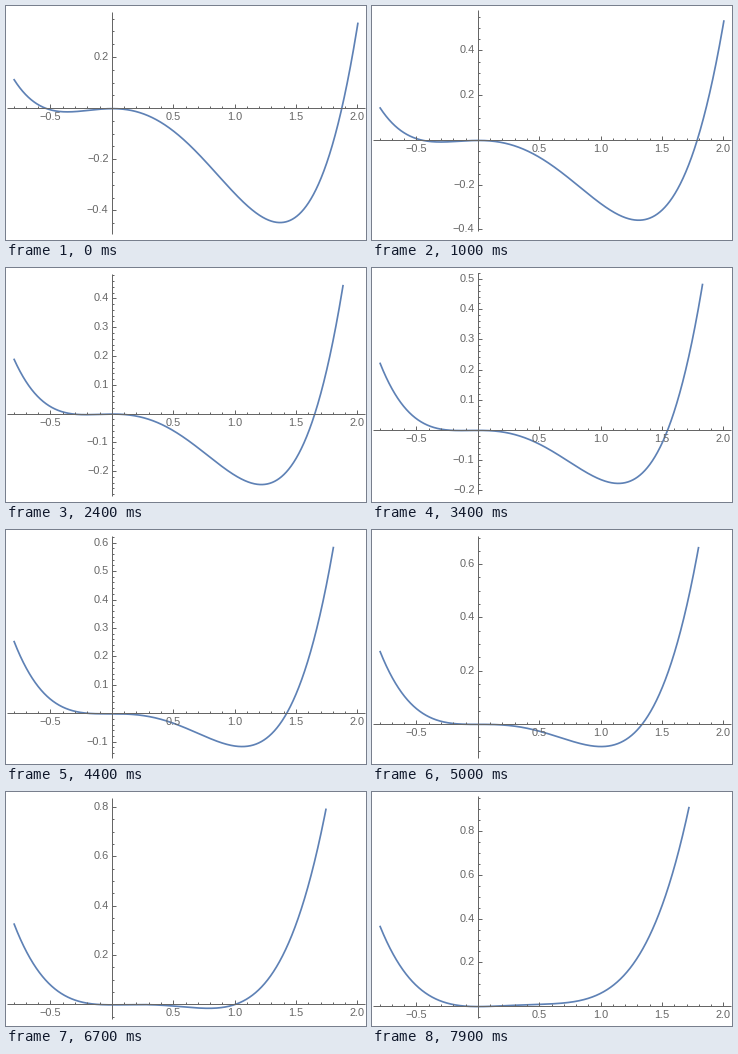
Animation, 360 px wide and 234 px high, one loop 8000 ms. Source, as a matplotlib script:

```python
import numpy as np
import matplotlib.pyplot as plt
from matplotlib.animation import FuncAnimation

W, H, DPI = 360, 234, 100
FRAMES, STEP_MS = 80, 100
PT = 72 / DPI                      # points per pixel

BLUE = (0.368, 0.507, 0.710)
GRAY = "#666666"

X_MIN, X_MAX = -0.8, 2.0
LEFT, RIGHT = 1, 359               # ends of the x axis, in pixels
BOX_H = (RIGHT - LEFT) / 1.618034  # golden-ratio plot box
TEXT_H = 6                         # half the height of a label
X_UNIT = 0.96 * (RIGHT - LEFT) / (X_MAX - X_MIN)
X_ZERO = (LEFT + RIGHT) / 2 - X_UNIT * (X_MIN + X_MAX) / 2

# upper end of the visible values once the right branch is cut off
CUT_AT = [12, 22, 24, 28, 34, 44, 54, 57, 63, 79]
CUT = [0.573, 0.468, 0.447, 0.445, 0.484, 0.585, 0.718, 0.728, 0.755, 0.91]

xs = np.linspace(X_MIN, X_MAX, 5601)


def quartic(x, c):
    return x**4 / 4 - x**3 / 3 - c * x**2 / 2


def tick_values(lo, hi, step):
    first, last = np.ceil(lo / step - 1e-6), np.floor(hi / step + 1e-6)
    return np.arange(first, last + 1) * step


def is_major(v, step):
    return abs(v / step - round(v / step)) < 1e-6


def fmt(v):
    return f"{v:.1f}".replace("-", "\u2212")


def px(v):
    """Position that the renderer snaps to the pixel holding v."""
    return np.floor(v) + 0.2


def path(segments):
    """Join separate segments into one line with gaps."""
    x, y = [], []
    for x0, y0, x1, y1 in segments:
        x += [x0, x1, np.nan]
        y += [y0, y1, np.nan]
    return x, y


fig = plt.figure(figsize=(W / DPI, H / DPI), dpi=DPI, facecolor="white")
ax = fig.add_axes([0, 0, 1, 1])
ax.set_xlim(0, W)
ax.set_ylim(H, 0)
ax.axis("off")

curve, = ax.plot([], [], color=BLUE, lw=1.7 * PT, zorder=2,
                 solid_capstyle="projecting", solid_joinstyle="round")
axes_line, = ax.plot([], [], color=GRAY, lw=1 * PT, zorder=3,
                     solid_capstyle="butt", snap=True)


def make_label(ha):
    return ax.text(0, 0, "", family="Liberation Sans", size=11 * PT,
                   color=GRAY, ha=ha, va="baseline", zorder=4)


x_marks = [-0.5, 0.5, 1.0, 1.5, 2.0]
x_labels = [make_label("center") for _ in x_marks]
y_labels = [make_label("right") for _ in range(12)]


def draw(i):
    c = 0.5 - 0.01 * i
    ys = quartic(xs, c)
    lo = min(ys.min(), 0)
    hi = ys[-1] if i < CUT_AT[0] else np.interp(i, CUT_AT, CUT)
    total = (hi - lo) / 0.9
    unit = BOX_H / total
    low, high = lo - 0.05 * total, hi + 0.05 * total

    # major and minor spacing follow the visible range
    major, minor = (0.1, 0.02) if total < 0.83 else (0.2, 0.05)
    slack = 0.6 / unit
    marks = [v for v in tick_values(low - slack, high + slack, major)
             if abs(v) > 1e-6]

    # centre the box together with labels that stick out of it
    def depth(v):
        return (high - v) * unit

    top = min(0, depth(marks[-1]) - TEXT_H)
    bottom = max(BOX_H, depth(marks[0]) + TEXT_H, depth(0) + 9 + TEXT_H)
    start = (H - top - bottom) / 2
    zero = start + depth(0)

    keep = (xs < 1) | (ys <= hi)
    curve.set_data(X_ZERO + xs[keep] * X_UNIT, zero - ys[keep] * unit)

    ox, oy = px(X_ZERO), px(zero)
    parts = [(LEFT, oy, RIGHT, oy), (ox, start, ox, start + BOX_H)]
    for v in tick_values(X_MIN, X_MAX, 0.1):
        x = px(X_ZERO + v * X_UNIT)
        parts.append((x, oy, x, oy - (4 if is_major(v, 0.5) else 2)))
    for v in tick_values(low, high, minor):
        if not is_major(v, major):
            y = px(zero - v * unit)
            parts.append((ox, y, ox + 2, y))
    for v in marks:
        y = px(zero - v * unit)
        parts.append((ox, y, ox + 4, y))
    axes_line.set_data(*path(parts))

    for label, v in zip(x_labels, x_marks):
        label.set_position((X_ZERO + v * X_UNIT - 0.8, np.floor(zero) + 12))
        label.set_text(fmt(v))
    for k, label in enumerate(y_labels):
        if k < len(marks):
            label.set_position((102.5, np.floor(zero - marks[k] * unit) + 3))
            label.set_text(fmt(marks[k]))
        else:
            label.set_text("")
    return [curve, axes_line, *x_labels, *y_labels]


anim = FuncAnimation(fig, draw, frames=FRAMES, interval=STEP_MS,
                     repeat=True, repeat_delay=0, blit=False)
plt.show()
```
